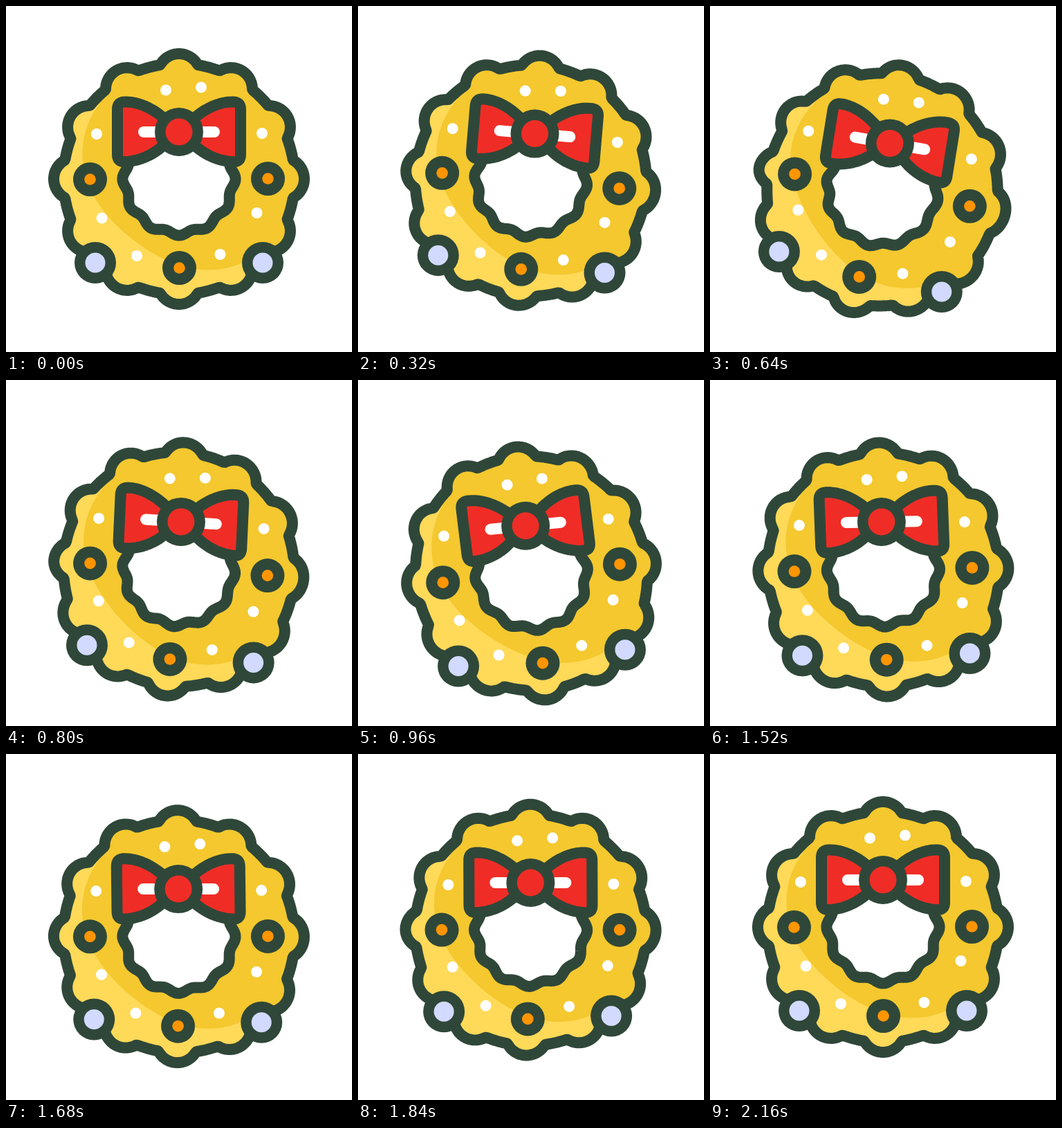
Animation of 500 by 500 pixels, one loop 2.28 s. Source, as an HTML page with a canvas:

```html
<!DOCTYPE html>
<html lang="en">
<head>
<meta charset="utf-8">
<title>Wreath</title>
<style>
html, body { margin: 0; width: 100%; height: 100%; overflow: hidden; background: #fff; }
canvas { display: block; width: 100vmin; height: 100vmin; }
</style>
</head>
<body>
<canvas id="stage"></canvas>
<script>
const LOOP = 2280, STEP = 40, C = 250, RAD = Math.PI / 180;
const DARK = '#2f4739', GOLD = '#f4c82e', LIGHT = '#ffd958', RED = '#ef2d26';
const ORANGE = '#ff9500', LILAC = '#d2daff', WHITE = '#fff';

const canvas = document.getElementById('stage');
const ctx = canvas.getContext('2d');
const pose = {};

const smooth = u => u * u * (3 - 2 * u);
const ease = (v, from, to) => smooth(Math.min(1, Math.max(0, (v - from) / (to - from))));

// The wreath drops and returns, swings right then left, and its lower half lags
function setPose(t) {
  const drop = 31.3 * (ease(t, 160, 1100) - ease(t, 1300, 2000));
  const swing = 10 * ease(t, 80, 560) - 17.5 * ease(t, 640, 1040) + 7.5 * ease(t, 1100, 1640);
  const lag = 3.9 * (ease(t, 160, 640) - ease(t, 640, 980))
    + 1.5 * (ease(t, 1440, 1840) - ease(t, 1840, 2160));
  pose.drop = drop;
  pose.drift = 0.02 * drop - 0.35 * lag;
  pose.stretch = 0.0006 * drop;
  pose.row = y => (swing + lag * ease(y, 230, 310)) * RAD;
  pose.axis = y => (swing - 0.05 * drop + 1.85 * lag * ease(y, 230, 310)) * RAD;
}

// Bends the upright axis and tilts each row across it
function warp([x, y]) {
  const n = 8, d = (y - C) / n, r = pose.row(y);
  let ax = C + pose.drift, ay = C + pose.drop;
  for (let i = 0; i < n; i++) {
    const q = pose.axis(C + d * (i + 0.5));
    ax -= Math.sin(q) * d;
    ay += Math.cos(q) * d * (1 + pose.stretch);
  }
  return [ax + (x - C) * Math.cos(r), ay + (x - C) * Math.sin(r)];
}

// Closed curve around (cx, cy); the angle runs clockwise from the top
function ring(cx, cy, radius, step = 1) {
  const pts = [];
  for (let a = 0; a < 360; a += step) {
    const r = radius(a);
    pts.push([cx + r * Math.sin(a * RAD), cy - r * Math.cos(a * RAD)]);
  }
  return pts;
}

// A disc joined with twelve round bumps
function rimRadius(a) {
  const off = ((a + 15) % 30 - 15) * RAD;
  const side = 150 * Math.sin(off);
  if (Math.abs(side) >= 31) return 167;
  return Math.max(167, 150 * Math.cos(off) + Math.sqrt(31 * 31 - side * side));
}

const rim = ring(C, C, rimRadius, 0.8);
const hole = ring(C, C, a => 78.8 + 2.8 * Math.cos(12 * a * RAD), 2);
// Wavy border at the lower left, open elsewhere
const shade = ring(275, 220, a =>
  a > 150 && a < 300 ? 157 - 8 * Math.cos(3 * (a - 218) * RAD) : 320);

function cubic(a, b, c, d) {
  const pts = [];
  for (let i = 0; i <= 12; i++) {
    const u = i / 12, v = 1 - u;
    pts.push([0, 1].map(k =>
      v * v * v * a[k] + 3 * v * v * u * b[k] + 3 * v * u * u * c[k] + u * u * u * d[k]));
  }
  return pts;
}

const wing = [
  ...cubic([161, 150], [161, 142], [164, 138.5], [173, 138.5]),
  ...cubic([173, 138.5], [192, 138.5], [212, 148], [228, 162]),
  ...cubic([228, 201], [212, 216], [192, 224], [173, 225]),
  ...cubic([173, 225], [164, 225.5], [161, 222], [161, 214])
];
const mirror = pts => pts.map(([x, y]) => [2 * C - x, y]);

const SNOW = [[231, 121.5], [282, 117.5], [131, 185], [370, 184], [138.5, 306.5],
  [362.5, 299], [189, 361], [309.5, 359]];
const BERRIES = [[121.5, 250.5], [378.5, 249.5], [250.5, 378.5]];

function trace(pts, closed = true) {
  ctx.beginPath();
  pts.forEach(p => ctx.lineTo(...warp(p)));
  if (closed) ctx.closePath();
}

function outline(color = DARK) {
  ctx.lineWidth = 16;
  ctx.strokeStyle = color;
  ctx.stroke();
}

function fill(color) {
  ctx.fillStyle = color;
  ctx.fill();
}

function disc(x, y, r, color) {
  ctx.beginPath();
  ctx.arc(...warp([x, y]), r, 0, 2 * Math.PI);
  fill(color);
}

function ball(x, y, outer, inner, color) {
  disc(x, y, outer, DARK);
  disc(x, y, inner, color);
}

function draw(t) {
  setPose(t);
  const size = Math.round(Math.min(innerWidth, innerHeight) * (window.devicePixelRatio || 1)) || 500;
  if (canvas.width !== size) canvas.width = canvas.height = size;
  ctx.setTransform(size / 500, 0, 0, size / 500, 0, 0);
  ctx.fillStyle = WHITE;
  ctx.fillRect(0, 0, 500, 500);
  ctx.lineJoin = ctx.lineCap = 'round';

  trace(rim);
  fill(LIGHT);
  ctx.save();
  ctx.clip();
  trace(shade);
  fill(GOLD);
  ctx.restore();
  trace(rim);
  outline();
  trace(hole);
  fill(WHITE);
  outline();

  SNOW.forEach(([x, y]) => disc(x, y, 8, WHITE));
  BERRIES.forEach(([x, y]) => ball(x, y, 24.5, 8.3, ORANGE));
  [129, 371].forEach(x => ball(x, 371, 30, 14.5, LILAC));

  for (const w of [wing, mirror(wing)]) {
    trace(w);
    fill(RED);
    outline();
  }
  trace([[199, 182], [301, 182]], false);
  outline(WHITE);
  ball(250, 182, 35, 19.5, RED);
}

function tick(now) {
  draw(Math.floor(now % LOOP / STEP) * STEP);
  requestAnimationFrame(tick);
}

draw(0);
requestAnimationFrame(tick);
</script>
</body>
</html>
```
